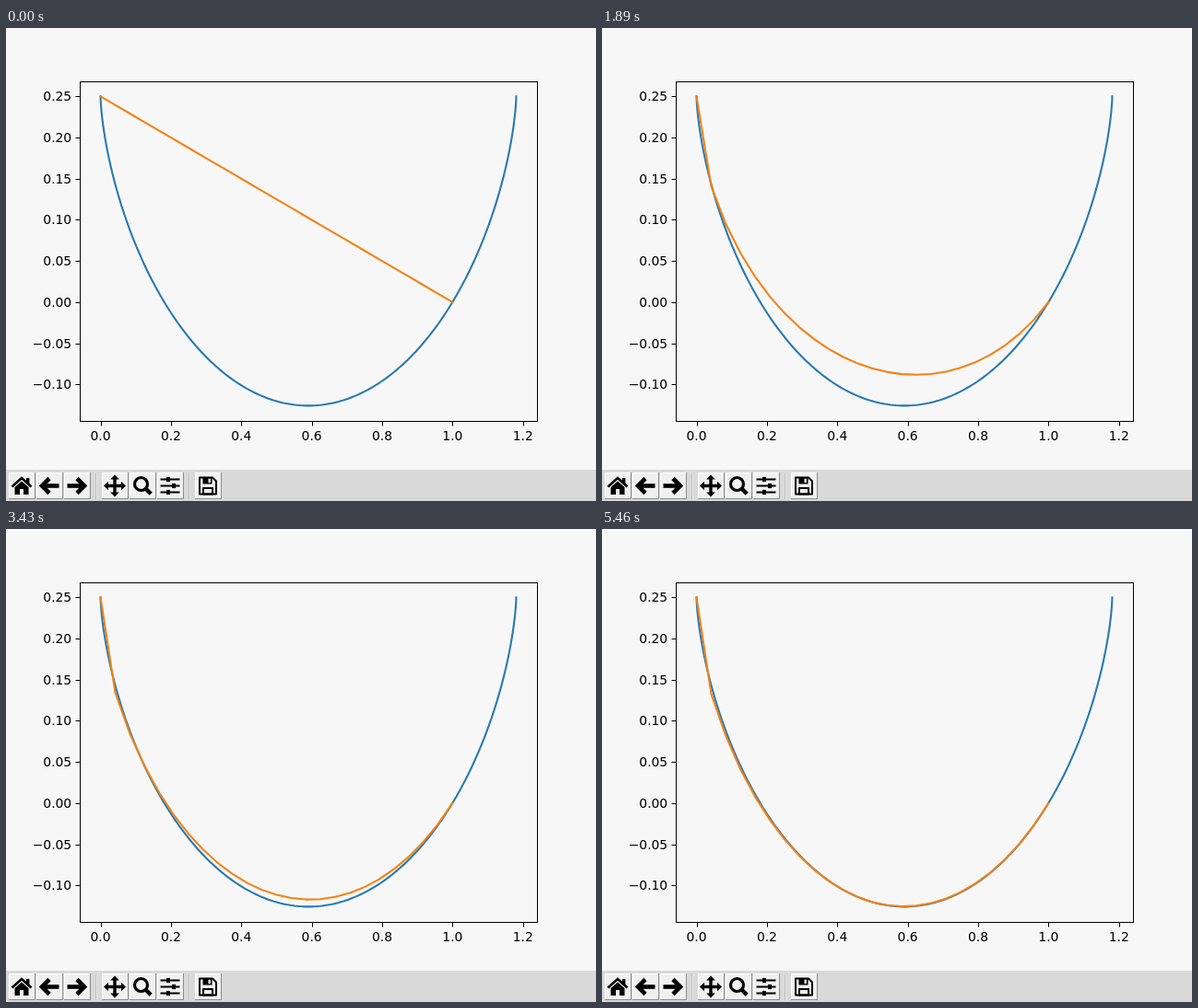
These frames come from a looping animation (640 by 514 pixels, 5.53 s). An HTML page with a canvas:

```html
<!DOCTYPE html>
<html lang="en">
<head>
<meta charset="utf-8">
<title>Descent to the cycloid</title>
<style>
html, body { margin: 0; width: 100%; height: 100%; overflow: hidden; background: #f7f7f7; }
canvas { display: block; width: 100vw; height: 100vh; }
</style>
</head>
<body>
<canvas id="stage" width="640" height="514"></canvas>
<script>
const ctx = document.getElementById('stage').getContext('2d');
const LOOP = 5530, HOLD = 140, TICK = 70;
const R = 0.18796, TOP = 0.25, SEGMENTS = 24;
const BLUE = '#2779b3', ORANGE = '#f58212';

const px = x => 102.55 + 381.8 * x;
const py = y => 74.4 + 893.8 * (TOP - y);

// Depth of the ideal curve at x, by Newton iteration on the rolling angle.
function cycloidDepth(x) {
  let a = 1 + 4 * x;
  for (let i = 0; i < 30; i++) a -= (a - Math.sin(a) - x / R) / (1 - Math.cos(a));
  return R * (1 - Math.cos(a));
}

// Slowest mode of the descent, about 1 in the middle and 0 at the right end.
const mode = x => 4.2 * x * Math.pow(1 - x, 1.07) * (1 + 0.0004 / (x * x));

// The coarse grid settles a little below the ideal curve near the start.
const settled = x =>
  cycloidDepth(x) * (1 + 0.0017 * Math.pow(x, -1.3) * (1 - x)) + 0.0008 * mode(x);

// The remaining gap is the slow mode plus a part that dies out faster near the start.
function depthAt(x, step) {
  if (x === 0) return 0;
  const end = settled(x), slow = 0.1965 * mode(x), fast = end - x / 4 - slow;
  return end - slow * Math.exp(-0.0625 * step) - fast * Math.exp(-0.17 * step / x);
}

function pathAt(step) {
  return Array.from({ length: SEGMENTS + 1 }, (_, i) => {
    const x = i / SEGMENTS;
    return [x, TOP - depthAt(x, step)];
  });
}

const cycloid = Array.from({ length: 301 }, (_, i) => {
  const a = 2 * Math.PI * i / 300;
  return [R * (a - Math.sin(a)), TOP - R * (1 - Math.cos(a))];
});

function plot(points, color) {
  ctx.beginPath();
  for (const [x, y] of points) ctx.lineTo(px(x), py(y));
  ctx.strokeStyle = color;
  ctx.lineWidth = 2.08;
  ctx.lineCap = 'square';
  ctx.lineJoin = 'round';
  ctx.stroke();
}

function trace(points) {
  ctx.beginPath();
  for (let i = 0; i < points.length; i += 2) ctx.lineTo(points[i], points[i + 1]);
}

function line(width, ...points) {
  trace(points);
  ctx.lineWidth = width;
  ctx.stroke();
}

function shape(...points) {
  trace(points);
  ctx.fill();
}

function box(color, x, y, w, h) {
  ctx.fillStyle = color;
  ctx.fillRect(x, y, w, h);
}

function axes() {
  ctx.strokeStyle = ctx.fillStyle = '#000';
  ctx.lineWidth = 1;
  ctx.lineCap = 'butt';
  ctx.lineJoin = 'miter';
  ctx.strokeRect(80.5, 58.5, 496, 369);
  ctx.font = '13.89px "DejaVu Sans", sans-serif';
  ctx.textBaseline = 'alphabetic';
  ctx.textAlign = 'right';
  for (let i = -2; i <= 5; i++) {
    const y = Math.round(py(i * 0.05));
    line(1, 75.5, y + 0.5, 80, y + 0.5);
    ctx.fillText((i < 0 ? '\u2212' : '') + Math.abs(i * 0.05).toFixed(2), 71.2, y + 5);
  }
  ctx.textAlign = 'center';
  for (let i = 0; i <= 6; i++) {
    const x = Math.round(px(i * 0.2));
    line(1, x + 0.5, 428, x + 0.5, 432.5);
    ctx.fillText((i * 0.2).toFixed(1), px(i * 0.2), 448);
  }
}

// Icons are drawn around the centre of their button.
function home() {
  line(2.6, -10.5, 1, 0, -8.5, 10.5, 1);
  ctx.fillRect(5, -8.5, 3.4, 6);
  shape(-7.5, 1.5, 0, -5, 7.5, 1.5, 7.5, 9.5, 2, 9.5, 2, 3.5, -2, 3.5, -2, 9.5, -7.5, 9.5);
}

function back() {
  line(4.6, 0, -8, -8, 0, 0, 8);
  line(4.6, -6, 0, 10.5, 0);
}

function forward() {
  ctx.scale(-1, 1);
  back();
}

function pan() {
  for (let i = 0; i < 4; i++) {
    line(3.4, 0, 0, 0, -9);
    shape(0, -12, 4.8, -7, -4.8, -7);
    ctx.rotate(Math.PI / 2);
  }
}

function zoom() {
  ctx.beginPath();
  ctx.arc(-1.5, -2, 7, 0, 2 * Math.PI);
  ctx.lineWidth = 3.2;
  ctx.stroke();
  line(4.4, 3.8, 3.4, 9.2, 8.8);
}

function sliders() {
  for (let i = -1; i <= 1; i++) {
    line(2, -10.5, 7 * i, 10.5, 7 * i);
    ctx.fillRect(i ? -4 : 2, 7 * i - 2.6, 4, 5.2);
  }
}

function save() {
  ctx.lineJoin = 'round';
  trace([-9, -9, 5, -9, 9, -5, 9, 9, -9, 9]);
  ctx.closePath();
  ctx.lineWidth = 2;
  ctx.stroke();
  ctx.fillRect(-5.5, -9, 10, 7);
  box('#f0f0f0', 0.5, -7.8, 2.4, 4.4);
  ctx.strokeRect(-5, 2.5, 10, 6.5);
}

function button(x, icon) {
  box('#8c8c8c', x - 14, 483, 29, 29);
  box('#ffffff', x - 14, 483, 28, 28);
  box('#f0f0f0', x - 13, 484, 27, 27);
  ctx.save();
  ctx.translate(x, 497.5);
  ctx.fillStyle = ctx.strokeStyle = '#000';
  ctx.lineCap = 'butt';
  ctx.lineJoin = 'miter';
  icon();
  ctx.restore();
}

function toolbar() {
  box('#d9d9d9', 0, 480, 640, 34);
  let x = 17;
  for (const group of [[home, back, forward], [pan, zoom, sliders], [save]]) {
    for (const icon of group) {
      button(x, icon);
      x += 30;
    }
    if (icon_gap(group)) {
      box('#c0c0c0', x - 10, 484, 1, 28);
      box('#e6e6e6', x - 9, 484, 1, 28);
      x += 11;
    }
  }
}

function icon_gap(group) {
  return group.length > 1;
}

function frame() {
  const t = performance.now() % LOOP;
  const step = Math.max(0, Math.floor((t - HOLD) / TICK));
  box('#f7f7f7', 0, 0, 640, 514);
  plot(cycloid, BLUE);
  plot(pathAt(step), ORANGE);
  axes();
  toolbar();
  requestAnimationFrame(frame);
}
frame();
</script>
</body>
</html>
```
